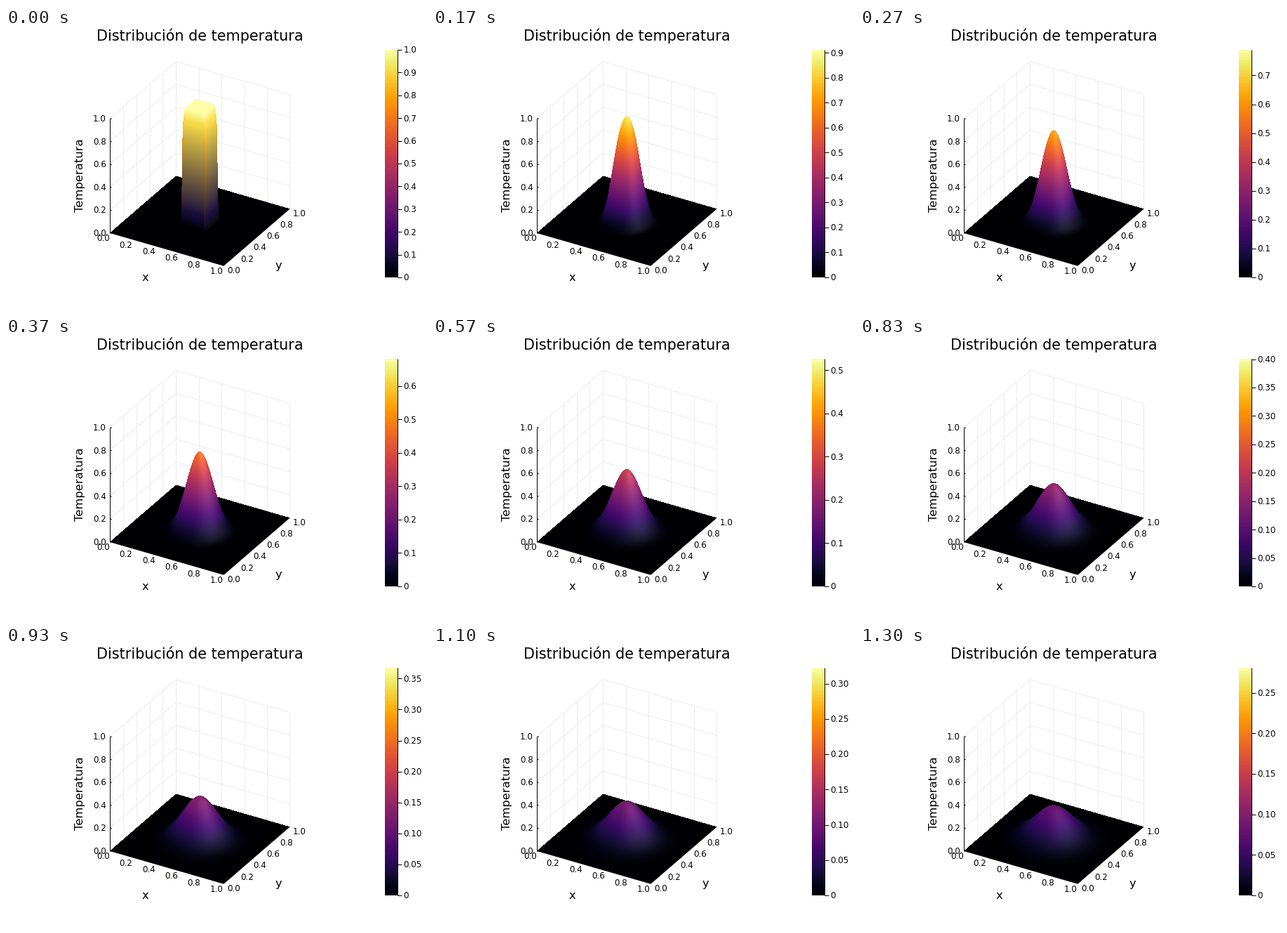
A matplotlib script for the animation above (1.33 s loop, 600x400 px).

```python
import math

import matplotlib.pyplot as plt
import numpy as np
from matplotlib.animation import FuncAnimation
from matplotlib.collections import LineCollection

# The playback clock ticks every 10 ms; the heat map advances 30 times a second
TICK_MS, LOOP_MS, FPS, STATES = 10, 1330, 30, 40
N, STEPS_PER_STATE = 100, 25
H = 1 / (N - 1)
RATE = 1e-5 / H**2          # diffusivity * dt / h^2

# Orthographic projection: stage pixels, y down
ORIGIN = np.array([148.2, 291.5])
EX, EY, EZ = np.array([[162, 46.7], [94, -81], [0, -162.8]])
LIGHT = np.array([0.76, -0.42, 0.5])

# Stage area holding the plate and its peak
LEFT, RIGHT, TOP, BOTTOM = 146, 408, 90, 344

TICK_SIZE, LABEL_SIZE, TITLE_SIZE = 8.57, 11.75, 14.95
BAR_LEFT, BAR_RIGHT, BAR_TOP, BAR_BOTTOM = 540, 558, 31, 355
INFERNO = plt.get_cmap("inferno")


def project(x, y, z):
    return tuple(ORIGIN[k] + x * EX[k] + y * EY[k] + z * EZ[k] for k in (0, 1))


def to_floor(px, py):
    """Plate coordinates of the floor point seen at a stage pixel."""
    dx, dy = px - ORIGIN[0], py - ORIGIN[1]
    det = EX[0] * EY[1] - EX[1] * EY[0]
    return (dx * EY[1] - dy * EY[0]) / det, (dy * EX[0] - dx * EX[1]) / det


def simulate():
    """Explicit heat equation with cold borders, started from a hot square."""
    axis = np.linspace(0, 1, N)
    hot = (axis >= 0.4) & (axis <= 0.6)
    u = np.outer(hot, hot).astype(float)
    states = []
    for step in range((STATES - 1) * STEPS_PER_STATE + 1):
        mid = u[1:-1, 1:-1]
        lap = u[2:, 1:-1] + u[:-2, 1:-1] + u[1:-1, 2:] + u[1:-1, :-2] - 4 * mid
        u = u.copy()
        u[1:-1, 1:-1] = mid + RATE * lap
        if step % STEPS_PER_STATE == 0:
            states.append(u)
    return states


def sample(field, x, y):
    """Bilinear lookup in a grid over the unit square."""
    gx, gy = np.clip(x, 0, 1) / H, np.clip(y, 0, 1) / H
    i, j = (np.minimum(g.astype(int), N - 2) for g in (gx, gy))
    fx, fy = gx - i, gy - j
    if field.ndim == 3:
        fx, fy = fx[..., None], fy[..., None]
    near = field[j, i] * (1 - fx) + field[j, i + 1] * fx
    far = field[j + 1, i] * (1 - fx) + field[j + 1, i + 1] * fx
    return near * (1 - fy) + far * fy


def shade(u):
    """Colour by height plus a soft grey highlight on slopes facing the light."""
    dy, dx = np.gradient(u, H)
    facing = (LIGHT[2] - dx * LIGHT[0] - dy * LIGHT[1]) / np.sqrt(1 + dx**2 + dy**2)
    rgb = INFERNO(u)[..., :3] + 0.11 * np.clip(facing, 0, 1)[..., None] ** 6
    return np.clip(rgb, 0, 1)


def render(u):
    """Scan each pixel column from front to back, keeping the rising horizon."""
    cols = np.arange(LEFT, RIGHT) + 0.5
    rows = np.arange(TOP, BOTTOM) + 0.5
    depth = np.arange(BOTTOM + 1, 205, -0.2)
    height = sample(u, *to_floor(cols[:, None], depth))
    horizon = np.minimum.accumulate(depth + EZ[1] * height, axis=1)
    hit = np.array([np.interp(rows, h[::-1], depth[::-1]) for h in horizon]).T
    x, y = to_floor(cols, hit)
    inside = (x >= 0) & (x <= 1) & (y >= 0) & (y <= 1)
    return np.dstack([sample(shade(u), x, y), inside])


def add_lines(segments, color="black", width=0.72, zorder=1):
    lines = LineCollection(segments, colors=color, linewidths=width, zorder=zorder)
    ax.add_collection(lines, autolim=False)
    return lines


def add_image(data, extent, **kw):
    return ax.imshow(data, extent=extent, aspect="auto", interpolation="nearest", **kw)


def put_text(x, y, text, size=TICK_SIZE, **kw):
    style = dict(ha="center", va="baseline", zorder=6) | kw
    return ax.text(x, y, text, fontsize=size, **style)


def draw_box():
    grid = []
    for v in np.linspace(0, 1, 6):
        grid += [
            [project(0, v, 0), project(0, v, 1)],
            [project(v, 1, 0), project(v, 1, 1)],
            [project(0, 0, v), project(0, 1, v)],
            [project(0, 1, v), project(1, 1, v)],
        ]
    add_lines(grid, color="0.925")

    corner, right = project(0, 0, 0), project(1, 0, 0)
    axes = [[corner, project(0, 0, 1)], [corner, right], [right, project(1, 1, 0)]]
    ticks = [[project(0, 0, v), project(0.016, 0, v)] for v in np.linspace(0, 1, 6)]
    add_lines(axes + ticks, zorder=4)

    for v in np.linspace(0, 1, 6):
        label = f"{v:.1f}"
        x, y = project(v, 0, 0)
        put_text(x - 9.8, y + 11.8, label)
        x, y = project(1, v, 0)
        put_text(x + 14.2, y + 10.7, label)
        x, y = project(0, 0, v)
        put_text(142.8, y + 4.5, label, ha="right")


def draw_labels():
    put_text(276.8, 18, "Distribución de temperatura", TITLE_SIZE)
    put_text(198.7, 360, "x", LABEL_SIZE)
    put_text(388.5, 343, "y", LABEL_SIZE)
    put_text(113.4, 209.7, "Temperatura", LABEL_SIZE, rotation=90, ha="right",
             va="center")


def draw_bar():
    add_image(np.linspace(1, 0, 256)[:, None],
              (BAR_LEFT, BAR_RIGHT, BAR_BOTTOM, BAR_TOP), cmap=INFERNO, zorder=2)
    add_lines([[(BAR_RIGHT, BAR_TOP), (BAR_RIGHT, BAR_BOTTOM)]], zorder=4)


def bar_ticks(peak):
    step, digits = (0.1, 1) if peak > 0.5 else (0.05, 2)
    segments, artists = [], []
    for k in range(math.floor(peak / step + 1e-6) + 1):
        y = BAR_BOTTOM - (BAR_BOTTOM - BAR_TOP) * k * step / peak
        segments.append([(BAR_RIGHT, y), (BAR_RIGHT + 6, y)])
        label = f"{k * step:.{digits}f}" if k else "0"
        artists.append(put_text(566.3, y + 4.4, label, ha="left"))
    return artists + [add_lines(segments, zorder=4)]


plt.rcParams["font.family"] = "DejaVu Sans"
fig = plt.figure(figsize=(6, 4), dpi=100, facecolor="white")
ax = fig.add_axes([0, 0, 1, 1])

states = simulate()
pictures = [render(u) for u in states]

draw_box()
draw_labels()
draw_bar()
surface = add_image(pictures[0], (LEFT, RIGHT, BOTTOM, TOP), zorder=3)
ax.set(xlim=(0, 600), ylim=(400, 0))
ax.axis("off")
changing = []


def update(frame):
    # Each state starts at its nearest clock tick
    k = int((frame + 0.5) * TICK_MS * FPS / 1000)
    surface.set_data(pictures[k])
    while changing:
        changing.pop().remove()
    changing.extend(bar_ticks(states[k].max()))
    return [surface, *changing]


anim = FuncAnimation(fig, update, frames=LOOP_MS // TICK_MS, interval=TICK_MS,
                     repeat=True, repeat_delay=0, blit=False)
plt.show()
```
